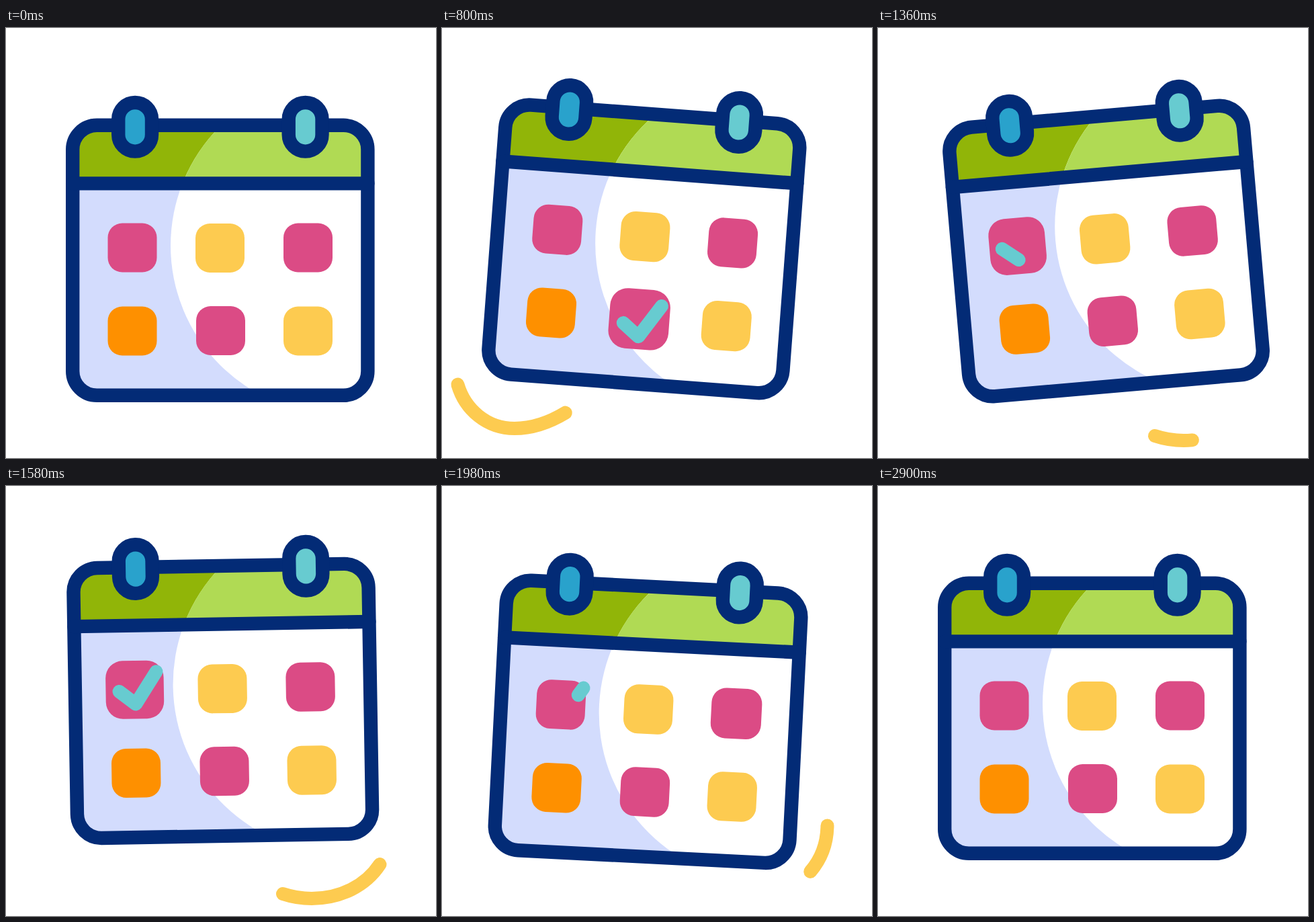
Animation, 640 px wide and 640 px high, one loop 3420 ms. Source, as an HTML page:

```html
<!DOCTYPE html>
<html lang="en">
<head>
<meta charset="utf-8">
<title>Calendar</title>
<style>
  html, body { margin: 0; width: 100%; height: 100%; overflow: hidden; background: #fff; }
  svg { display: block; width: 100%; height: 100%; }
  .trim { fill: none; stroke-linecap: round; stroke-linejoin: round; }
</style>
</head>
<body>
<svg viewBox="0 0 640 640">
  <defs>
    <clipPath id="page"><rect x="99.2" y="144.8" width="439.2" height="402" rx="36"/></clipPath>
  </defs>
  <g id="swooshes" stroke="#fdcb50" stroke-width="20">
    <path class="trim" pathLength="1" d="M188 570C163 586 135 596 108 596C58 596 21.5 555 19.5 507"/>
    <path class="trim" pathLength="1" d="M412 607C427 612 441 614 455 614C520 614 573.5 570 573.5 504"/>
  </g>
  <g id="calendar">
    <g clip-path="url(#page)">
      <rect x="89" y="134" width="460" height="424" fill="#d3dcfd"/>
      <rect x="89" y="134" width="460" height="97" fill="#91b508"/>
      <circle cx="496" cy="324" r="251" fill="#fff"/>
      <path id="light" fill="#b0da54"/>
      <rect x="496" y="231" width="60" height="330" fill="#fff"/>
    </g>
    <g fill="none" stroke="#032b76" stroke-width="20.4">
      <rect x="99.2" y="144.8" width="439.2" height="402" rx="36"/>
      <path d="M99.2 231.4H538.4" stroke-linecap="round"/>
    </g>
    <g stroke="#032b76" stroke-width="20.4">
      <rect x="167.2" y="111" width="49.8" height="72.6" rx="24.9" fill="#29a2cc"/>
      <rect x="420.7" y="111" width="49.8" height="72.6" rx="24.9" fill="#67cbd0"/>
    </g>
    <g id="days"></g>
    <g id="checks" stroke="#67cbd0" stroke-width="20"></g>
  </g>
</svg>
<script>
const LOOP = 3420;
const BEAT = 1400 / 3;            // half a swing
const SWING = 444, HOP = 630;     // first swing start, first hop peak
const PIVOT = { x: 320, y: 106 };
const PINK = '#db4b85', YELLOW = '#fdcb50', ORANGE = '#fe9000';

const $ = id => document.getElementById(id);
const clamp = u => Math.max(0, Math.min(1, u));
const smooth = u => u * u * (3 - 2 * u);
const ramp = (t, a, b) => clamp((t - a) / (b - a));

function make(parent, tag, attrs) {
  const el = document.createElementNS('http://www.w3.org/2000/svg', tag);
  for (const k in attrs) el.setAttribute(k, attrs[k]);
  return parent.appendChild(el);
}

// Eased value through [time, value] keys
function tween(t, keys) {
  let [t0, v0] = keys[0];
  for (const [t1, v1] of keys) {
    if (t < t1) return t <= t0 ? v0 : v0 + (v1 - v0) * smooth(ramp(t, t0, t1));
    [t0, v0] = [t1, v1];
  }
  return v0;
}

// Show only the part of a path between fractions a and b
function trim(el, a, b) {
  const on = b > 0 && a < 1 && b > a;
  el.style.display = on ? '' : 'none';
  if (!on) return;
  el.setAttribute('stroke-dasharray', `${b - a} 3`);
  el.setAttribute('stroke-dashoffset', -a);
}

const beats = (start, values) => values.map((v, i) => [start + i * BEAT, v]);
const tilt = beats(SWING, [0, 5, -5, 5, -5, 0]);
const hop = [[205, 0], ...beats(HOP, [-26, 6.4, -26, 6.4, 0])];

const days = [
  [188, 327, PINK], [318.5, 327.5, YELLOW], [449.5, 327, PINK],
  [188, 451, ORANGE], [319.5, 450.5, PINK], [449.5, 451, YELLOW]
].map(([x, y, fill]) => ({
  x, y,
  el: make($('days'), 'rect', { x: -36.5, y: -36.5, width: 73, height: 73, rx: 21.5, fill })
}));

// day index, corner of the tick, drawing times, wiping times, pulse keys
const ticks = [
  { day: 4, dx: 0.5, dy: 26, draw: [470, 770], wipe: [785, 1155], pulse: [[300, 1], [733, 1.24], [1260, 1]] },
  { day: 0, dx: 1.1, dy: 21.3, draw: [1240, 1550], wipe: [1660, 2085], pulse: [[1080, 1], [1500, 1.2], [1970, 1]] },
  { day: 2, dx: -2, dy: 21.4, draw: [2050, 2365], wipe: [2470, 2885], pulse: [[1860, 1], [2290, 1.15], [2860, 1]] }
];
for (const k of ticks) {
  const x = days[k.day].x + k.dx, y = days[k.day].y + k.dy;
  k.el = make($('checks'), 'path', {
    class: 'trim', pathLength: 1, d: `M${x - 24.3} ${y - 19}L${x} ${y}L${x + 31.2} ${y - 47.8}`
  });
}

// Header part of the large circle
const edge = y => 496 - Math.sqrt(251 ** 2 - (y - 324) ** 2);
$('light').setAttribute('d', `M${edge(231)} 231A251 251 0 0 1 ${edge(140)} 140H550V231Z`);

function draw(t) {
  const { x, y } = PIVOT;
  $('calendar').setAttribute('transform',
    `translate(0 ${tween(t, hop)}) rotate(${tween(t, tilt)} ${x} ${y})`);

  const scale = days.map(() => 1);
  for (const k of ticks) {
    scale[k.day] = tween(t, k.pulse);
    trim(k.el, smooth(ramp(t, ...k.wipe)), smooth(ramp(t, ...k.draw)));
  }
  days.forEach((d, i) =>
    d.el.setAttribute('transform', `translate(${d.x} ${d.y}) scale(${scale[i]})`));

  [...$('swooshes').children].forEach((el, i) => {
    const s = t - i * 2 * BEAT;
    const head = 1 - (1 - ramp(s, 348, 1210)) ** 3;
    const u = ramp(s, 688, 1329);
    const tail = u < 0.5 ? 4 * u ** 3 : 1 - 4 * (1 - u) ** 3;
    trim(el, tail, head);
  });
}

const start = performance.now();
function tick() {
  draw((performance.now() - start) % LOOP);
  requestAnimationFrame(tick);
}
tick();
</script>
</body>
</html>
```
